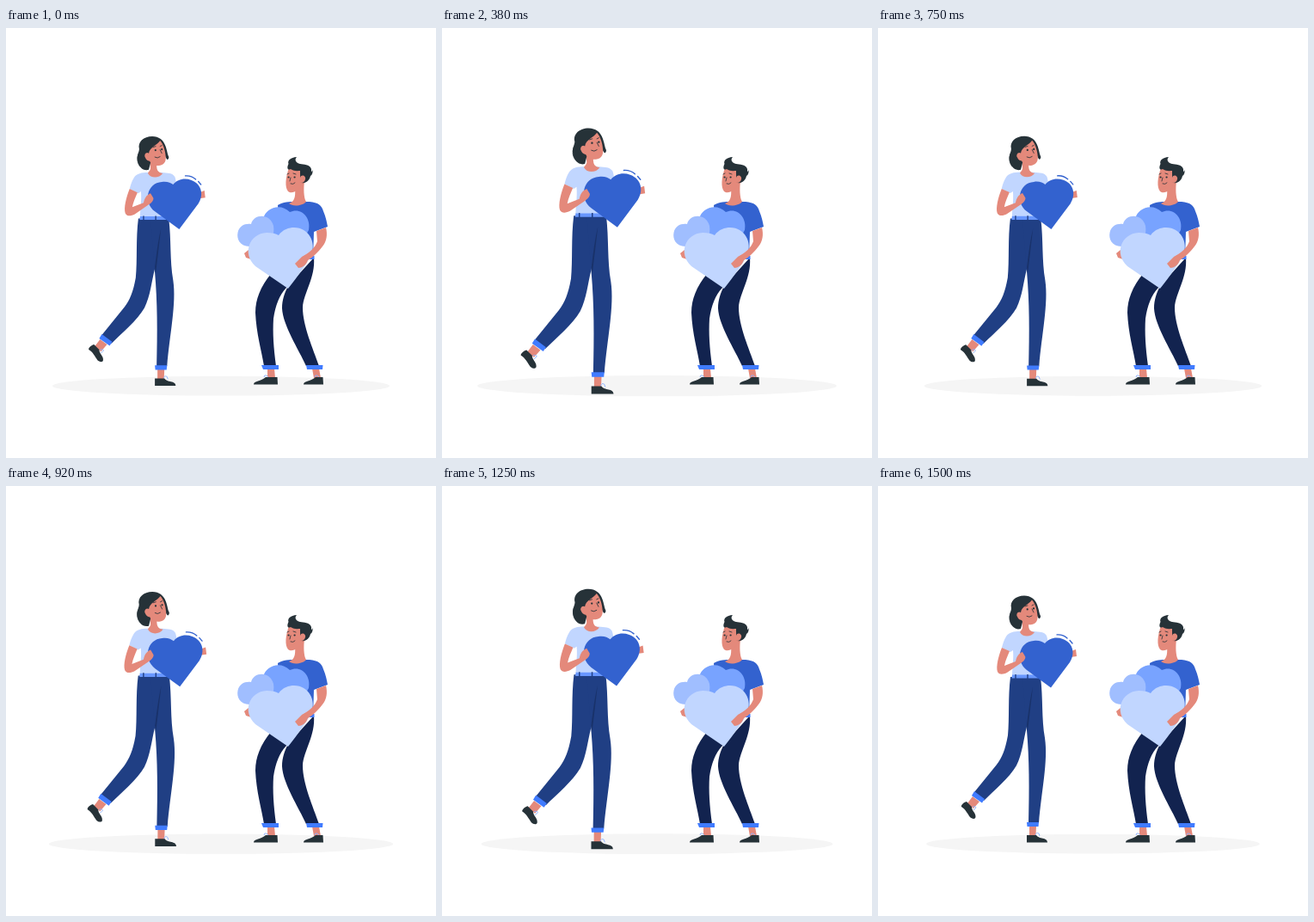
An HTML page for the animation above (1540 ms loop, 500 by 500 pixels).

```html
<!DOCTYPE html>
<html lang="en">
<head>
<meta charset="utf-8">
<title>Sharing hearts</title>
<style>
  html, body { margin: 0; width: 100%; height: 100%; overflow: hidden; background: #fff; }
  svg { display: block; width: 100vw; height: 100vh; }
  .skin { fill: #e4897b; }
  .dark { fill: #263238; }
  .royal { fill: #3362cf; }
  .bright { fill: #407bff; }
  .pale { fill: #c1d6ff; }
  .line { fill: none; stroke: #263238; stroke-width: .8; stroke-linecap: round; }
  .lace { fill: none; stroke: #8fb3ff; stroke-width: .9; }
</style>
</head>
<body>
<svg viewBox="0 0 500 500">
  <ellipse id="shadow" cx="250" cy="416.2" rx="193.9" ry="11.3" fill="#f5f5f5"/>

  <g id="man">
    <path class="skin" d="M304 396h8l1 11h-9zM356 396h8l2 11h-8z"/>
    <path class="lace" d="M300 406q0-3 3-2l3 3M359 406q0-3 3-2l3 3"/>
    <path class="dark" d="M288 414.500C288 410 297 411 302 406H315.500L316 414.500ZM346 414.500C346 410 355 411 360 406H368.500L369 414.500Z"/>
    <g fill="#12234f">
      <path d="M358 267C360 290 346 308 345 325C345 346 357 373 364 393H349C340 373 322 346 321 326C321 316 324 308 328 300Z"/>
      <path d="M308 286C296 301 290 315 290 331C291 355 297 375 300 393H314C311 372 310 354 311 338C313 323 318 310 326 302L346 268Z"/>
    </g>
    <path class="bright" d="M297 392H317V397H299ZM349 392H368.500L368 397H350Z"/>

    <path class="royal" d="M316 206C322 202 330 202 335 202L353 202C363 203 367 206 369 213C372 220 373 226 374 231L358 237L357 268H320Z"/>
    <path class="bright" d="M353 265L358.500 265V269H353Z"/>
    <path class="skin" d="M336 187L347 177C346 187 346 197 349 202C345 207 333 208 329 204C335 202 337 197 336 187Z"/>
    <path class="skin" d="M329 163C325 174 324 185 328 190C333 194 341 188 344 182C349 181 351 174 349 169L344 163Z"/>
    <path class="dark" d="M338 150C331 150.500 327 154 328.500 158C326.500 162 327 166 331 164C335 167 340 166 342 166C342 171 342 176 343 180C349 181 353 177 354 172C356 171 357 168 356.500 165C355 168 355 168 355 164C353 158 346 159 342 158C337 157 335 153 338 150Z"/>
    <path class="skin" d="M342 174c1-4 7-3 6 2-1 4-5 5-6 3z"/>
    <g class="dark"><circle cx="328.600" cy="173.500" r="1.100"/><circle cx="335.600" cy="173.500" r="1.100"/></g>
    <path class="line" d="M327 170l2-1M334 169l3 1M331 181q3 1.500 5-1M331 174l-1 4"/>

    <path fill="#78a3ff" d="M299 222C302 209 319 203 330 214C343 208 355 220 352 235L329 275L299 250Z"/>
    <path fill="#a0beff" d="M285 228C288 216 307 215 311 230C313 241 307 247 302 256L283 254C272 254 268 245 269.500 238C271 230 278 227 285 228Z"/>
    <path class="skin" d="M282 258L277 262L279 267L285 269Z"/>
    <path class="pale" d="M328 303L290 277C274 262 283 239 303 238C309 238 314 239 317 241C322 234 329 232 335 232C352 232 361 249 355 264C350 274 339 289 328 303Z"/>
    <path class="skin" d="M361 236L372 232C374 240 373 248 368 254C363 261 356 267 351 270C349 276 344 279 340 279L336 274L344 266C352 262 360 255 362 248Z"/>
  </g>

  <g id="woman">
    <path class="skin" d="M110 361L118 367L111 375L104 369ZM176 395H184L183.500 407H176Z"/>
    <path class="lace" d="M110 373q4-1 4 1l-3 3M183 406q1-4 4-2l1 3"/>
    <path class="dark" d="M97 373C96 371 101 367 103 367L109 373C109 378 114 380 113.500 385C113 388 109 387 107 385C104 381 102 376 97 373ZM173 406H184C187 411 197 408 197 414.500H173Z"/>
    <g fill="#203f84">
      <path d="M154 222C151 245 153 270 151 290C148 307 144 316 138 324L112 356L123 366C135 354 153 339 161 325C168 311 169 295 173 280L183 222Z"/>
      <path d="M168 222H189C192 247 190 270 194 293C198 320 190 355 187 392H175C176 352 176 318 173 284Z"/>
    </g>
    <path fill="#19326a" d="M180 234L174 285L173 278C175 262 177 246 180 234Z"/>
    <path class="bright" d="M112 355L124 364L121 368.500L109 360ZM173 391H187L186.500 396H173.500Z"/>

    <path class="pale" d="M165 169C158 169 152 170 149 175C146 180 145 184 144 188L154 193L157 191C158 202 156 211 156 221H189V198H199C198 188 198 180 196 174C193 169 188 170 181 169Z"/>
    <path fill="#6897ff" d="M156 219.500H189L189.500 223.500H155.500Z"/>
    <path d="M160 219v5M174 219v5M187 219v5" stroke="#203f84" stroke-width="1.400"/>
    <path class="skin" d="M167 153L168 165C167 168 165 169 165 170C168 176 178 176 182 170C176 169 175 166 175 160Z"/>
    <path class="dark" d="M170 127.500C160 127.500 153 134 155 142C155 146 152 149 153 155C154 163 160 168 166 166L170 150L180 138C183 144 184 151 187 154C188 155 190 152 188.500 150C186 143 186 128 170 127.500Z"/>
    <path class="skin" d="M179 132.500C175 138 167 140 166 147C163 145 160 149 162 152C163 155 166 156 167 156C169 160 174 162 179 161C184 160 186 156 185.500 151C185 144 183 137 179 132.500Z"/>
    <g class="dark"><circle cx="173.700" cy="143.500" r="1.100"/><circle cx="181" cy="142.500" r="1.100"/></g>
    <path class="line" d="M171 140l3-1M179 139l2-1M173 151.500q3 2 6-.5M179 143l2 4M154 148Q151 156 156 162"/>

    <path class="skin" d="M222 193L230 190L231 198L224 199Z"/>
    <path class="royal" d="M201 234.500L173 214C159 203 164 181 181 180C187 179 191 181 194 183C199 177 207 175 215 178C228 183 229 196 223 205Z"/>
    <path class="skin" d="M144 188C140 198 137 210 139 216C141 220 146 219 150 217L166 206C171 203 172 199 171 198L168 193C163 195 161 199 160 204L147 209C148 203 151 197 153 192Z"/>
    <path d="M208 173Q215 172.500 220 177M223 179.500L226 183" fill="none" stroke="#3362cf" stroke-width="1.300" stroke-linecap="round"/>
  </g>
</svg>
<script>
  const LOOP = 1540, STEPS = 37;
  // [time in ms, growth] of the two beats
  const beat = [[0, .011], [267, .1], [375, .077], [583, .041], [820, 0],
                [1118, .1], [1250, .054], [1500, 0], [LOOP, .011]];
  const shadow = document.getElementById('shadow');
  const woman = document.getElementById('woman');

  function growth(t) {
    const i = beat.findIndex(key => key[0] > t);
    const [t0, a] = beat[i - 1], [t1, b] = beat[i];
    return a + (b - a) * (t - t0) / (t1 - t0);
  }

  function scaleAbout(node, x, y, s) {
    node.setAttribute('transform', `translate(${x} ${y}) scale(${s}) translate(${-x} ${-y})`);
  }

  function draw(now) {
    const step = Math.floor(now % LOOP / LOOP * STEPS);
    const s = 1 + growth(step * LOOP / STEPS);
    scaleAbout(shadow, 250, 416.2, s);
    scaleAbout(woman, 164, 271, s);
    requestAnimationFrame(draw);
  }
  draw(0);
</script>
</body>
</html>
```
